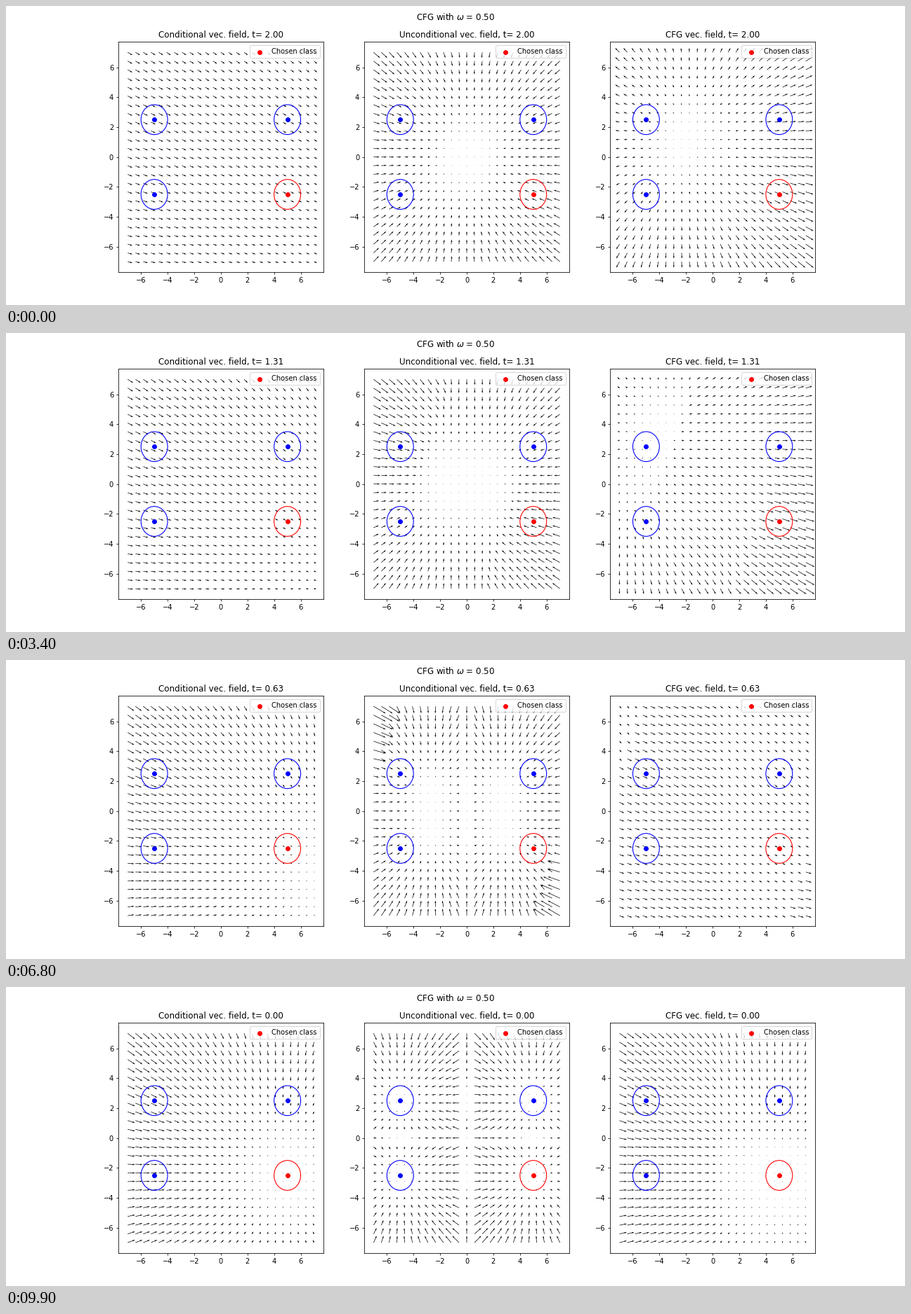
Animation of 1280x427 px, one loop 10 s. Source, as a matplotlib script:

```python
import numpy as np
import matplotlib.pyplot as plt
from matplotlib.animation import FuncAnimation
from matplotlib.patches import Circle

FRAMES = 100
OMEGA = 0.5
DPI = 1280 / 18
CHOSEN = (5, -2.5)
OTHERS = [(-5, -2.5), (-5, 2.5), (5, 2.5)]
NAMES = ["Conditional", "Unconditional", "CFG"]

times = np.linspace(2, 0, FRAMES)
axis = np.linspace(-7, 7, 25)
X, Y = np.meshgrid(axis, axis)


def conditional(decay):
    return (CHOSEN[0] * decay - X * decay**2,
            CHOSEN[1] * decay - Y * decay**2)


def unconditional(decay):
    slope = decay / max(1 - decay**2, 1e-3)
    side_x = np.tanh(5 * X * slope)
    side_y = np.tanh(2.5 * Y * slope)
    # Far along the falling diagonal the pull follows the other class pair.
    far = 30 * slope * (np.abs(X - 0.4 * Y) - 15.45 * decay)
    p = 0.5 + 0.5 * np.tanh(far / 2)
    mean_x = 5 * ((1 - p) * side_x + p * side_y * np.abs(side_x))
    return mean_x * decay - X, 2.5 * side_y * decay - Y


def fields(t):
    decay = np.exp(-t)
    cond, uncond = conditional(decay), unconditional(decay)
    guided = [(1 + OMEGA) * c - OMEGA * u for c, u in zip(cond, uncond)]
    return cond, uncond, guided


def mark(ax, center, color, label=None):
    ax.scatter(*center, color=color, label=label)
    ax.add_patch(Circle(center, 1, fill=False, edgecolor=color, lw=1.1))


fig, axes = plt.subplots(
    1, 3, dpi=DPI, figsize=((1280 + 1e-6) / DPI, (427 + 1e-6) / DPI))
fig.suptitle(rf"CFG with $\omega$ = {OMEGA:.2f}")

quivers = []
for ax in axes:
    quivers.append(ax.quiver(X, Y, X, Y, scale=1))
    for center in OTHERS:
        mark(ax, center, "blue")
    mark(ax, CHOSEN, "red", "Chosen class")
    ax.set(xlim=(-7.7, 7.7), ylim=(-7.7, 7.7),
           xticks=range(-6, 7, 2), yticks=range(-6, 7, 2))
    ax.legend(loc="upper right")


def update(i):
    t = times[i]
    for ax, name, quiver, (u, v) in zip(axes, NAMES, quivers, fields(t)):
        # Keep the mean arrow length constant in every frame.
        quiver.scale = 45 * np.hypot(u, v).mean()
        quiver.set_UVC(u, v)
        ax.set_title(f"{name} vec. field, t= {t:.2f}")
    return quivers


anim = FuncAnimation(fig, update, frames=FRAMES, interval=100,
                     repeat=True, repeat_delay=0)
plt.show()
```
